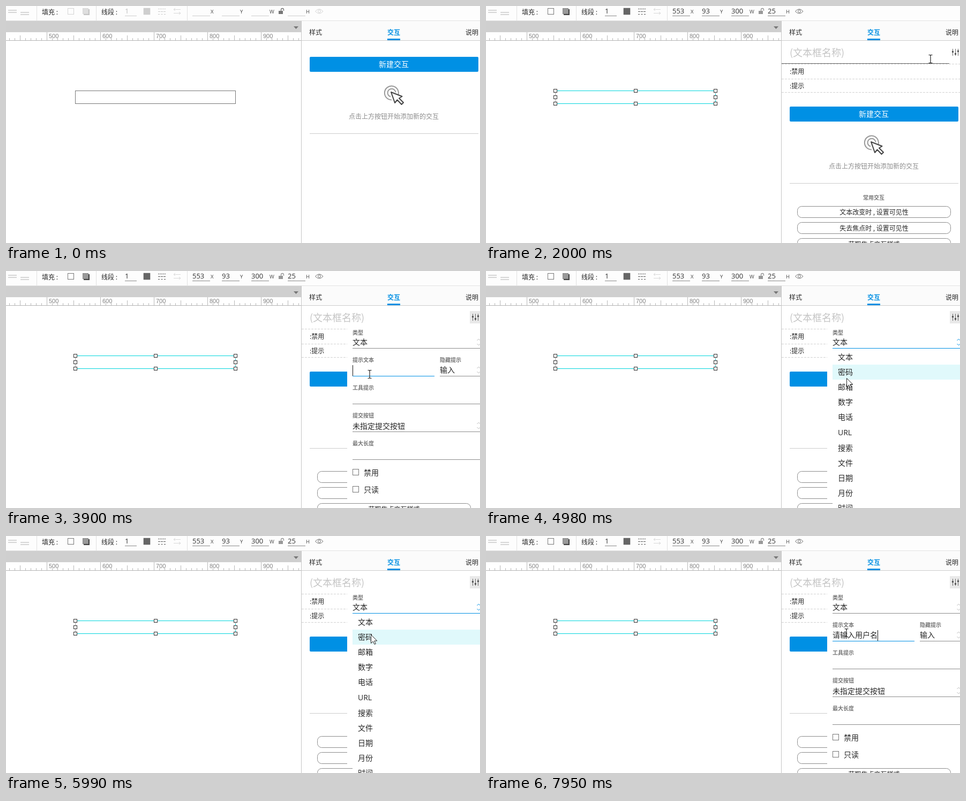
Animation, 885 px wide and 443 px high, one loop 8000 ms. Source, as an HTML page:

```html
<!DOCTYPE html>
<html lang="zh">
<head>
<meta charset="utf-8">
<style>
html, body { margin: 0; width: 100%; height: 100%; overflow: hidden; background: #fff; }
svg { display: block; width: 885px; height: 443px; font-family: "Noto Sans CJK SC", "Noto Sans CJK", sans-serif; }
.num { font-family: "Open Sans", sans-serif; }
.ruler { font-family: "Liberation Sans", Arial, sans-serif; }
</style>
</head>
<body>
<svg id="stage" viewBox="0 0 885 443"></svg>
<script>
const LOOP = 8000, BLUE = '#0090e4', GRAY = '#8c8c8c', DARK = '#444', INK = '#262626', CYAN = '#00d5dc';

// Markup helpers; text is placed by its vertical centre.
const text = (x, cy, size, s, fill = INK, extra = '') =>
  `<text x="${x}" y="${cy + size * 0.38}" font-size="${size}" fill="${fill}" ${extra}>${s}</text>`;
const rect = (x, y, w, h, fill, extra = '') =>
  `<rect x="${x}" y="${y}" width="${w}" height="${h}" fill="${fill}" ${extra}/>`;
const box = (x, y, w, h, stroke, extra = '', fill = '#fff') =>
  rect(x + 0.5, y + 0.5, w - 1, h - 1, fill, `stroke="${stroke}" ${extra}`);
const path = (d, stroke, extra = '') => `<path d="${d}" fill="none" stroke="${stroke}" ${extra}/>`;
const hline = (x1, x2, y, fill, extra = '') => rect(x1, y, x2 - x1, 1, fill, extra);
const group = (id, body, extra = '') => `<g id="${id}" ${extra}>${body}</g>`;
const bold = 'font-weight="bold"', mid = 'text-anchor="middle"';

function toolbar() {
  let s = rect(0, 0, 885, 27, '#fdfdfd') + hline(0, 885, 27, '#e2e2e2');
  for (const [x, y] of [[4, 7], [27, 11]])
    s += rect(x, y, 16, 2, '#d6d6d6') + rect(x, y + 4, 16, 2, '#d6d6d6');
  for (const x of [57, 168, 338]) s += rect(x, 0, 1, 27, '#e0e0e0');
  s += text(67, 11, 12, '填充 :') + text(178, 11, 12, '线段 :');
  s += path('M313 6.5H326M316 4L313 6.5L316 9M313 13.5H326M323 11L326 13.5L323 16', '#d8d8d8');
  const tools = box(115, 4, 12, 12, '#777') + rect(145, 6, 11, 11, '#444') + box(143, 4, 11, 11, '#888', '', '#999') +
    text(222, 9, 13, '1', INK, 'class="num"') + rect(257, 4, 12, 12, '#666', 'stroke="#555" stroke-width=".5"') +
    path('M284 5.5H298', '#555', 'stroke-dasharray="2 1"') + path('M284 10.5H298', '#555', 'stroke-dasharray="4 1"') +
    path('M284 15.5H298', '#555', 'stroke-dasharray="3 2.5"') +
    path('M577.5 10Q585 1.500 592 10Q585 18 577.5 10Z', '#777') +
    '<circle cx="585" cy="9.800" r="2.500" fill="none" stroke="#777"/>';
  s += group('tools', tools);
  let lines = hline(222, 244, 18, '#888'), values = '';
  for (const [x, name, value] of [[348, 'X', 553], [403, 'Y', 93], [458, 'W', 300], [526, 'H', 25]]) {
    lines += hline(x, x + 33, 18, '#888');
    values += text(x, 9, 13, value, '#333', 'class="num"');
    s += text(x + 34, 10, 9.5, name, '#444', 'class="num"');
  }
  s += group('lines', lines) + group('values', values);
  return s + group('lock', rect(509, 9, 8, 6, '#777') + path('M513.5 9V7Q513.5 4.500 516 4.500T518.5 7V9', '#777', 'stroke-width="1.300"'));
}

function ruler() {
  let s = rect(0, 28, 551, 21, '#cfcfcf') + '<path d="M537 38H546L541.500 43Z" fill="#777"/>' + hline(0, 551, 64, '#b4b4b4');
  for (let x = 6; x < 551; x += 10) {
    const major = x % 100 === 76, half = x % 100 === 26, top = major ? 49 : half ? 55 : 60;
    s += rect(x, top, 1, 64 - top, '#b8b8b8');
    if (major) s += text(x + 4, 56.3, 11, 424 + x, '#808080', 'class="ruler"');
  }
  return s;
}

function canvas() {
  let grips = box(129, 158, 300, 25, '#aaa') + hline(129, 429, 158, CYAN) + hline(129, 429, 182, CYAN) +
    path('M428.5 158V182', CYAN, 'stroke-dasharray="4 2"');
  for (const y of [158, 170, 182])
    for (const x of [129, 279, 428])
      if (x !== 279 || y !== 170) grips += box(x - 3, y - 3, 7, 7, '#333');
  return box(129, 158, 300, 25, '#777', 'id="field"') + group('grips', grips);
}

function panel() {
  const arrow = 'M719 161L726 181L730.500 175.500L738.500 184L742 180.500L734 172.500L739.500 169Z';
  const start = rect(567, 95, 315, 28, BLUE, 'rx="2"') + text(724, 109, 14, '新建交互', '#fff', mid) +
    path('M720 175.500A13 13 0 1 1 732.500 165.500', '#999', 'stroke-width="2"') +
    path('M718 169.500A7.500 7.500 0 1 1 727.500 161.500', '#999', 'stroke-width="2"') +
    `<path d="${arrow}" fill="#fff" stroke="#444" stroke-width="2" stroke-linejoin="round"/>` +
    text(724, 206, 12, '点击上方按钮开始添加新的交互', GRAY, mid) + hline(567, 882, 238, '#ccc');
  const sliders = path('M871.5 80V93M876.5 80V93M881.5 80V93', '#666') +
    rect(870, 84, 3, 3, '#555') + rect(875, 88, 3, 3, '#555') + rect(880, 83, 3, 3, '#555');
  let more = text(567, 87, 18, '(文本框名称)', '#c4c4c4') + rect(866, 75, 19, 23, '#e9e9e9', 'id="iconBg"') + sliders;
  for (const y of [108, 136, 161]) more += path(`M552 ${y + 0.5}H885`, '#d2d2d2', 'stroke-dasharray="4 2"');
  more += hline(552, 865, 107, '#666', 'id="nameLine"');
  more += text(567, 122, 12, ':禁用') + text(567, 149, 12, ':提示') + text(724, 358.5, 10, '常用交互', '#777', mid + bold);
  ['文本改变时 , 设置可见性', '失去焦点时 , 设置可见性', '获取焦点交互样式'].forEach((label, i) => {
    more += box(581, 374 + i * 30, 287, 22, GRAY, 'rx="8"') + text(724.5, 385 + i * 30, 12, label, INK, mid);
  });
  return rect(552, 28, 333, 36, '#fbfbfb') + rect(551, 28, 1, 415, '#c6c6c6') + hline(552, 885, 64, '#cdcdcd') +
    text(566, 49, 12, '样式') + text(712, 49, 12, '交互', BLUE, bold) + text(858, 49, 12, '说明') +
    rect(712, 61, 24, 3, BLUE) + group('start', start) + group('more', more);
}

const chevron = (y, id) => path(`M879.500 ${y - 3}L882.500 ${y - 6}L885.500 ${y - 3}M879.500 ${y + 3}L882.500 ${y + 6}L885.500 ${y + 3}`, '#bbb', `id="${id}"`);

function popup() {
  const label = (x, y, s) => text(x, y, 10, s, '#777', bold);
  let s = rect(637, 101, 248, 325, '#fff');
  s += label(647, 115, '类型') + text(647, 133, 14, '文本') + hline(647, 885, 144, GRAY, 'id="typeLine"') + chevron(133, 'typeMark');
  s += label(647, 166, '提示文本') + hline(647, 800, 196, GRAY, 'id="hintLine"');
  s += group('typed', text(647, 185, 14, '请输入用户名')) + rect(647, 176, 1, 20, '#111', 'id="caret"');
  s += label(810, 166, '隐藏提示') + text(810, 185, 14, '输入') + hline(810, 885, 196, GRAY) + chevron(185, 'hideMark');
  s += label(647, 218, '工具提示') + hline(647, 885, 248, GRAY);
  s += label(647, 270, '提交按钮') + text(647, 290, 14, '未指定提交按钮') + hline(647, 885, 300, GRAY) + chevron(289, 'submitMark');
  s += label(647, 322, '最大长度') + hline(647, 885, 352, GRAY);
  return s + box(647, 370, 12, 12, '#777') + text(668, 377, 14, '禁用') + box(647, 402, 12, 12, '#777') + text(668, 409, 14, '只读');
}

function menu() {
  const items = ['文本', '密码', '邮箱', '数字', '电话', 'URL', '搜索', '文件', '日期', '月份', '时间'];
  return rect(647, 146, 238, 297, '#fff') + rect(647, 147, 238, 28, '#e0f9fb', 'id="active"') +
    items.map((s, i) => text(657, 161 + i * 28 + (i > 5 ? 2 : i === 5 ? 1 : 0), 14, s, INK, i === 5 ? 'class="num"' : '')).join('');
}

const pointer = group('arrow', '<path d="M.5 .5V16.500L4.300 13L7 18.500L9.300 17.500L6.800 12H11.800Z" fill="#fff" stroke="#222"/>') +
  group('beam', path('M-3.500 -7.500H-1L0 -6.500L1 -7.500H3.500M0 -6.500V6.500M-3.500 7.500H-1L0 6.500L1 7.500H3.500', '#222', 'stroke-width="1.200"'));

document.getElementById('stage').innerHTML = toolbar() + ruler() + canvas() + panel() +
  group('popup', popup()) + group('menu', menu()) + group('pointer', pointer);

// Pointer path: time, x, y.
const track = [
  [340, 638, 418], [560, 520, 330], [800, 340, 205], [980, 288, 172], [1450, 288, 172], [1740, 560, 385],
  [1880, 760, 250], [2000, 830, 99], [2310, 875, 88], [2480, 875, 88], [3260, 690, 172], [3410, 680, 194],
  [3650, 684, 197], [3820, 684, 197], [3900, 679, 193], [4370, 690, 131], [4820, 690, 131], [4980, 673, 200],
  [5210, 672, 246], [5590, 672, 246], [5670, 671, 240], [6140, 685, 158], [6310, 686, 161], [6530, 686, 161],
  [6780, 673, 181], [8000, 673, 181]
];

function pointerAt(t) {
  let i = 1;
  while (i < track.length - 1 && track[i][0] < t) i++;
  const [t0, x0, y0] = track[i - 1], [t1, x1, y1] = track[i];
  const k = Math.min(1, Math.max(0, (t - t0) / (t1 - t0)));
  return [x0 + (x1 - x0) * k, y0 + (y1 - y0) * k];
}

const el = id => document.getElementById(id);
const set = (id, name, value) => el(id).setAttribute(name, value);
const show = (id, on) => set(id, 'display', on ? 'inline' : 'none');

function render(t) {
  const [x, y] = pointerAt(t);
  const over = (l, top, r, b) => x >= l && x <= r && y >= top && y <= b;
  const during = (a, b) => t >= a && t < b;
  const selected = t >= 1160, opened = t >= 2460, menuOpen = during(4520, 6310);
  const typeFocus = during(4520, 6930), hintFocus = during(3410, 4520) || t >= 6930;
  const overName = selected && !opened && over(552, 75, 865, 107);
  const overHint = opened && !menuOpen && over(647, 165, 800, 198);
  const overType = opened && over(647, 119, 885, 145);

  set('tools', 'opacity', selected ? 1 : 0.3);
  set('lines', 'opacity', selected ? 1 : 0.4);
  show('values', selected);
  set('lock', 'opacity', selected ? 0.75 : 1);
  set('field', 'stroke', t >= 340 && over(129, 158, 429, 183) ? CYAN : '#777');
  show('grips', selected);
  set('start', 'transform', `translate(0 ${selected ? 93 : 0})`);
  show('more', selected);
  show('nameLine', overName);
  show('iconBg', opened || over(866, 75, 885, 98));

  show('popup', opened);
  set('typeLine', 'fill', typeFocus ? BLUE : overType ? DARK : GRAY);
  set('typeMark', 'stroke', typeFocus ? BLUE : '#bbb');
  set('hintLine', 'fill', hintFocus ? BLUE : overHint ? DARK : GRAY);
  show('typed', t >= 7950);
  show('caret', during(3410, 4180) || during(6990, 7480) || t >= 7950);
  set('caret', 'x', t >= 7950 ? 731 : 647);

  show('menu', menuOpen);
  show('active', y >= 147);
  set('active', 'y', 147 + 28 * Math.floor((y - 147) / 28));

  show('pointer', t >= 340);
  set('pointer', 'transform', `translate(${Math.round(x)} ${Math.round(y)})`);
  show('beam', overName || overHint);
  show('arrow', !(overName || overHint));
}

const begin = performance.now();
function tick() {
  render((performance.now() - begin) % LOOP);
  requestAnimationFrame(tick);
}
tick();
</script>
</body>
</html>
```
